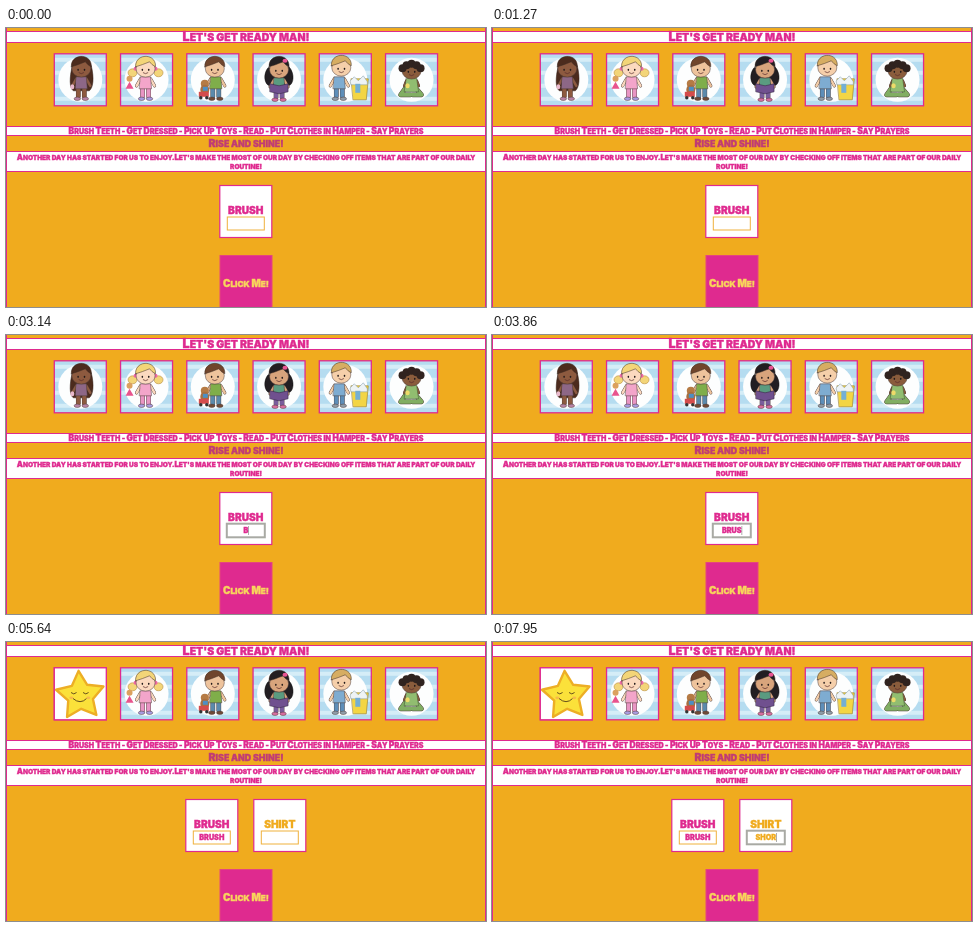
Write an HTML page that moves like this. It is 480 by 279 pixels and loops after 8000 ms.

```html
<!DOCTYPE html>
<html lang="en">
<head>
<meta charset="utf-8">
<title>Morning routine</title>
<style>
  html, body { margin: 0; width: 100%; height: 100%; overflow: hidden; background: #f0ab1e; }
  svg { display: block; width: 100vw; height: 100vh; }
  text { font-family: Inter, "Open Sans", sans-serif; font-weight: 900; text-anchor: middle; stroke-width: .35; }
</style>
</head>
<body>
<svg id="stage" viewBox="0 0 480 279"></svg>
<script>
const ORANGE = '#f0ab1e', PINK = '#df2a8f', LOOP = 8000;
const stage = document.getElementById('stage');

// Shape helpers, all returning SVG markup
const rect = (x, y, w, h, fill, stroke = 'none', sw = 1) =>
  `<rect x="${x}" y="${y}" width="${w}" height="${h}" fill="${fill}" stroke="${stroke}" stroke-width="${sw}"/>`;
const oval = (x, y, rx, ry, fill, extra = '') =>
  `<ellipse cx="${x}" cy="${y}" rx="${rx}" ry="${ry}" fill="${fill}" ${extra}/>`;
const path = (d, fill, stroke = 'none', sw = 1) =>
  `<path d="${d}" fill="${fill}" stroke="${stroke}" stroke-width="${sw}" stroke-linecap="round" stroke-linejoin="round"/>`;
const limb = (d, color, w = 3) => path(d, 'none', '#4a3a38', w + .7) + path(d, 'none', color, w);
const group = (x, y, content) => `<g transform="translate(${x} ${y})">${content}</g>`;

// Small capitals: uppercase letters are set a little larger
const label = (str, x, y, size, color) => {
  const body = str.replace(/[A-Z]+|[^A-Z]+/g, part => /[A-Z]/.test(part)
    ? `<tspan font-size="${size * 1.2}">${part}</tspan>` : part.toUpperCase());
  return `<text x="${x}" y="${y}" font-size="${size}" fill="${color}" stroke="${color}">${body}</text>`;
};

const face = (x, y, skin) =>
  oval(x, y, 9.5, 8.3, skin, 'stroke="#4a3a38" stroke-width=".5"') +
  oval(x - 3.2, y + 1, .8, 1.1, '#221a1a') + oval(x + 3.2, y + 1, .8, 1.1, '#221a1a') +
  path(`M${x - 2.3} ${y + 4}q2.3 2 4.6 0`, 'none', '#5a2c2c', .7);

const fringe = (x, y, color) =>
  path(`M${x - 10} ${y + 1}C${x - 11} ${y - 13} ${x + 11} ${y - 13} ${x + 10} ${y + 1}Q${x + 6} ${y - 1} ${x + 4} ${y - 4}Q${x - 3} ${y - 1} ${x - 10} ${y + 1}Z`, color, '#3a2a22', .5);

const body = (x, y, skin, top, bottom, feet = '#fff') =>
  limb(`M${x - 3} ${y + 9}V${y + 20}M${x + 3} ${y + 9}V${y + 20}`, bottom, 4) +
  oval(x - 4, y + 22, 3.2, 1.7, feet, 'stroke="#4a3a38" stroke-width=".5"') +
  oval(x + 4, y + 22, 3.2, 1.7, feet, 'stroke="#4a3a38" stroke-width=".5"') +
  limb(`M${x - 5} ${y + 2}L${x - 9} ${y + 9}M${x + 5} ${y + 2}L${x + 9} ${y + 9}`, skin, 2.4) +
  path(`M${x - 5} ${y}H${x + 5}L${x + 6} ${y + 12}H${x - 6}Z`, top, '#4a3a38', .5);

const cardBack = () => {
  let bands = rect(0, 0, 52, 52, '#b5dcf0');
  for (let i = 0; i < 4; i++) bands += rect(0, 4 + i * 13, 52, 4, '#d5edf7');
  return bands + oval(26, 26, 22, 22, '#fdfefe');
};

const kids = [
  () => path('M18 12C15 24 15 34 19 37H35C39 34 40 24 37 12Z', '#4c2b1d', '#2f1a13', .5) +
    body(27, 23, '#8d5a3f', '#8d6786', '#8d5a3f', '#b983a5') +
    face(27, 15, '#8d5a3f') + fringe(27, 12, '#4c2b1d') +
    oval(18, 33, 2, 2.5, '#e9b9cc'),
  () => [12, 38].map(x => oval(x, 19, 4.5, 4, '#f3d578', 'stroke="#a87c32" stroke-width=".5"') +
      oval(x + (x < 25 ? 3 : -3), 15, 2, 2, '#ef6aa5')).join('') +
    body(25, 23, '#fbd9bf', '#f3a5ca', '#e995c4', '#a99be0') +
    face(25, 15, '#fbd9bf') + fringe(25, 12, '#f3d578') +
    oval(9, 25, 3, 3, '#dba15f') + path('M9 28L5 35H13Z', '#e8538d'),
  () => body(29, 23, '#eec39c', '#7fae4a', '#5b8aac', '#704a37') +
    face(28, 15, '#eec39c') + fringe(28, 12, '#70452c') +
    oval(18, 30, 4, 4, '#b57b45') + oval(18, 36, 4.5, 5, '#a96e3e') +
    rect(12, 38, 10, 5, '#d44c4c') + oval(14, 44, 1.7, 1.7, '#333') + oval(20, 44, 1.7, 1.7, '#333') +
    rect(16, 33, 5, 4, '#4c8fc4'),
  () => path('M15 14C9 21 12 33 18 32H34C40 33 43 21 36 13Z', '#221e22', '#111', .5) +
    body(26, 24, '#d8a47c', '#5a9b80', '#7a5d9c', '#d86da0') +
    face(26, 16, '#d8a47c') + fringe(26, 12, '#221e22') +
    oval(32, 7, 2.5, 2, '#ea5594') +
    path('M17 30L26 32L35 30V38L26 40L17 38Z', '#70508f', '#3a2a48', .6),
  () => body(20, 23, '#f5cfaa', '#7eacd1', '#5d8eb9', '#8f9ca8') +
    face(22, 14, '#f5cfaa') + fringe(22, 11, '#d6ad62') +
    path('M32 25H49L47 46H34Z', '#f3d544', '#957a24', .6) +
    path('M31 27L35 23L39 27L44 22L48 28V31H32Z', '#eef3f5', '#7895a8', .5) +
    rect(36, 30, 5, 9, '#74afd4'),
  () => limb('M20 34L15 41H25M30 34L36 41H27', '#81ae63', 4) +
    limb('M21 27L19 32L25 32M31 27L33 32L27 32', '#8a5c3c', 2.4) +
    path('M21 24H31L33 38H19Z', '#91bd70', '#405536', .5) +
    face(26, 17, '#8a5c3c') +
    [-9, -5, 0, 5, 9].map(d => oval(26 + d, 10 + d * d / 18, 4, 4, '#30231f')).join('') +
    oval(22, 32, 2.2, 2.5, '#eedb69')
];

const starCard = () => {
  const points = Array.from({ length: 10 }, (_, i) => {
    const a = (i * 36 - 94) * Math.PI / 180, r = i % 2 ? 13 : 25;
    return `${26 + r * Math.cos(a)} ${28 + r * Math.sin(a)}`;
  });
  return rect(0, 0, 52, 52, '#fff') + path(`M${points.join('L')}Z`, '#fbe13a', '#edae25', 2.4) +
    path('M17 25q2.5 2.5 5 0M29 25q2.5 2.5 5 0M19 31q7 6 13 0', 'none', '#66501b', 1) +
    oval(17, 30, 2, 1.4, '#f7b94a') + oval(34, 30, 2, 1.4, '#f7b94a');
};

const bar = (y, h) => rect(.5, y, 479, h, '#fff', PINK);
const card = (x, y, content) => group(x, y, content + rect(0, 0, 52, 52, 'none', PINK, 1.3));

stage.innerHTML = rect(0, 0, 480, 279, ORANGE) +
  bar(3.5, 11) + bar(98.5, 9) + bar(123.5, 20) +
  rect(.5, -2, 479, 283, 'none', PINK) +
  label("Let's get ready man!", 240, 13.2, 10.5, PINK) +
  label('Brush Teeth - Get Dressed - Pick Up Toys - Read - Put Clothes in Hamper - Say Prayers', 240, 106.2, 7.1, PINK) +
  label('Rise and shine!', 240, 118.8, 8.8, '#c03c75') +
  label("Another day has started for us to enjoy.Let's make the most of our day by checking off items that are part of our daily", 240, 131.6, 6.5, PINK) +
  label('routine!', 240, 140.8, 6.5, PINK) +
  kids.map((kid, i) => card(48.3 + i * 66.25, 25.8, cardBack() + kid())).join('') +
  `<g id="star">${card(48.3, 25.8, starCard())}</g>` +
  rect(214, 227.5, 52, 52, PINK, '#e5457f') + label('Click Me!', 240, 258.6, 8.2, '#f8d65c') +
  '<g id="tasks"></g>';

const star = document.getElementById('star'), tasks = document.getElementById('tasks');
const CLICK = 5150;
const brush = { name: 'brush', color: PINK, word: 'brush', focus: 2300, blur: CLICK, keys: [3050, 3350, 3600, 3800, 4000] };
const shirt = { name: 'shirt', color: ORANGE, word: 'shor', focus: 6350, blur: LOOP, keys: [7200, 7450, 7650, 7870] };

function drawTask(task, x, t) {
  const focused = t >= task.focus && t < task.blur;
  const typed = task.keys.filter(k => k <= t).length;
  const box = focused ? rect(7, 31.2, 38, 13.6, '#fff', '#a9aaa4', 2) : rect(7.5, 31.5, 37, 13, '#fff', '#efb13c');
  const node = document.createElementNS('http://www.w3.org/2000/svg', 'g');
  node.setAttribute('transform', `translate(${x} 157.5)`);
  node.innerHTML = rect(0, 0, 52, 52, '#fff', PINK, 1.2) + label(task.name, 26, 28.3, 10.2, task.color) +
    box + label(task.word.slice(0, typed), 26, 40.4, 7.2, task.color);
  tasks.append(node);
  const lastEvent = typed ? task.keys[typed - 1] : task.focus;
  if (focused && (t - lastEvent) % 1000 < 500) {
    const end = 26 + node.lastElementChild.getComputedTextLength() / 2;
    node.insertAdjacentHTML('beforeend', rect(end, 33.5, .6, 9, '#777'));
  }
}

function frame(now) {
  const t = now % LOOP, clicked = t >= CLICK;
  star.style.display = clicked ? '' : 'none';
  tasks.replaceChildren();
  drawTask(brush, clicked ? 179.8 : 213.8, t);
  if (clicked) drawTask(shirt, 247.8, t);
  requestAnimationFrame(frame);
}
frame(performance.now());
</script>
</body>
</html>
```
